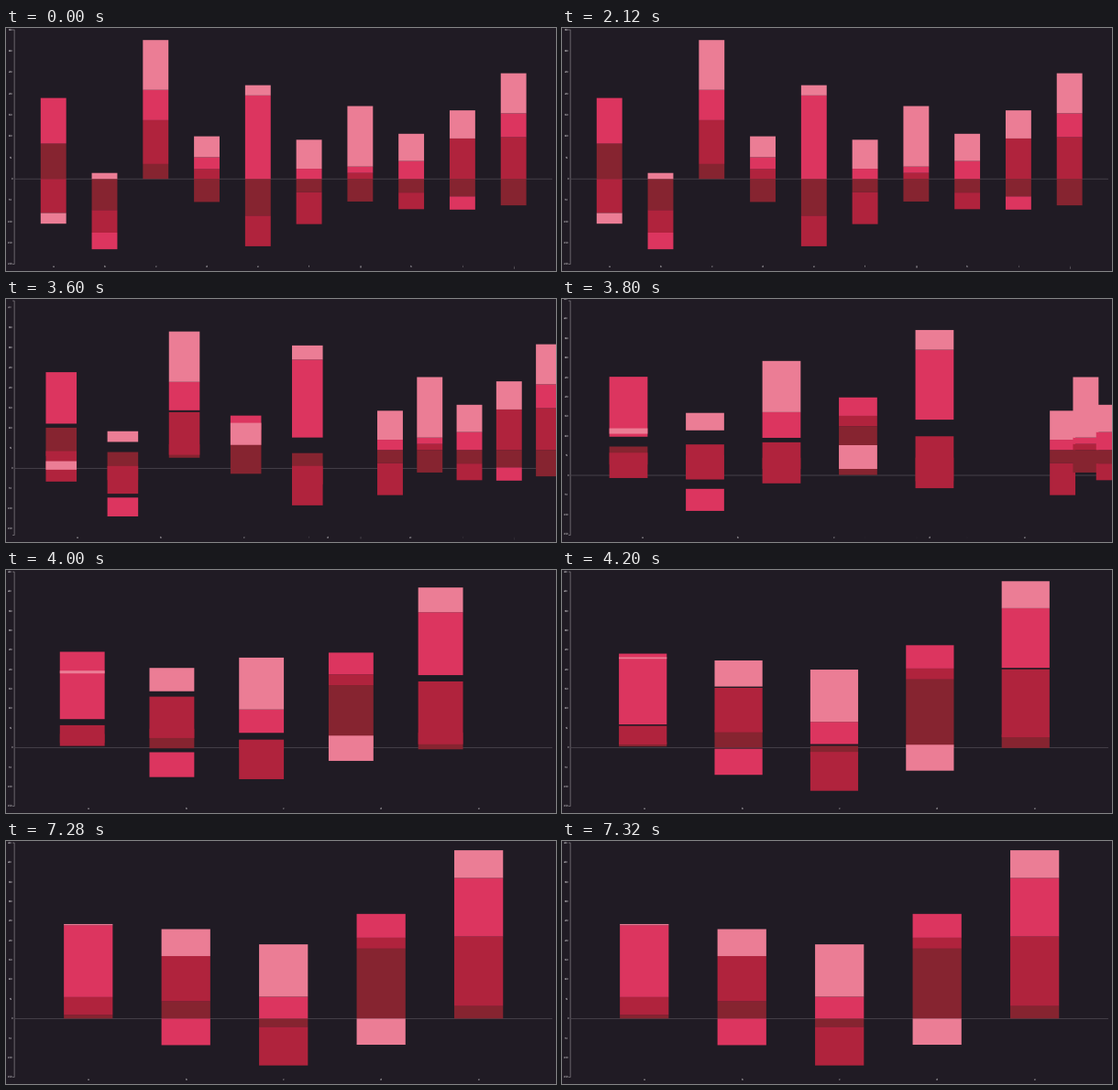
A matplotlib script for the animation above (8000 ms loop, 600x266 px).

```python
import matplotlib.pyplot as plt
import numpy as np
from matplotlib.animation import FuncAnimation
from matplotlib.patches import Rectangle

W, H, DPI = 600, 266, 100
STEP, FRAMES = 40, 200
START, BAR_TIME, AXIS_TIME = 3026, 1500, 1000

BG, INK, AXIS, RULE = "#201b24", "#e6e3e7", "#8a868c", "#4c4750"

LEFT, RIGHT, TOP, BOTTOM = 9.9, 595.5, 2, 258.5
EXIT_X = 711

# The charted values: for each series colour, ten categories, then five.
SERIES = {
    "#862430": ([83, -73, 35, -54, -86, -31, -53, -32, -41, -62],
                [9, 44, -21, 179, 32]),
    "#b0233d": ([-80, -53, 103, 23, -72, -75, 14, -39, 95, 98],
                [46, 116, -99, 28, 178]),
    "#dc355f": ([107, -39, 71, 28, 196, 24, 15, 42, -31, 56],
                [184, -68, 56, 61, 150]),
    "#eb7d95": ([-25, 14, 117, 49, 24, 68, 142, 64, 66, 94],
                [3, 69, 134, -67, 71]),
}


def ease(ms, duration):
    t = min(max((ms - START) / duration, 0), 1)
    return 4 * t**3 if t < 0.5 else 1 - 4 * (1 - t) ** 3


def mix(a, b, p):
    return a + (b - a) * p


def y_scale(low, high):
    unit = (BOTTOM - TOP) / (high - low)
    return lambda v: BOTTOM - (v - low) * unit


def bands(n):
    """Left edges and width of n bars with half-step padding."""
    step = (RIGHT - LEFT) / (n + 0.5)
    return LEFT + step * (np.arange(n) + 0.5), step / 2


def layout(series, scale):
    """Boxes (x, y, width, height) by category, stacked outward from zero."""
    values = np.array(series).T
    xs, width = bands(len(values))
    boxes = []
    for x, row in zip(xs, values):
        ends = {True: 0, False: 0}
        for v in row:
            base = ends[v > 0]
            tip = ends[v > 0] = base + v
            top, bottom = scale(max(base, tip)), scale(min(base, tip))
            boxes.append((x, top, width, bottom - top))
    return np.array(boxes)


y_old, y_new = y_scale(-200, 350), y_scale(-150, 450)
before, after = zip(*SERIES.values())
old, new = layout(before, y_old), layout(after, y_new)

# Categories that leave slide off to the right, unchanged.
leaving = old[len(new):].copy()
leaving[:, 0] = EXIT_X
new = np.vstack([new, leaving])

plt.rcParams["text.hinting"] = "none"
fig = plt.figure(figsize=(W / DPI, H / DPI), dpi=DPI, facecolor=BG)
ax = fig.add_axes([0, 0, 1, 1])
ax.set(xlim=(0, W), ylim=(H, 0))
ax.axis("off")


def label(x, y, s, px, align):
    return ax.text(x, y, s, color=INK, size=px * 72 / DPI, ha=align,
                   va="center", family="Liberation Sans", clip_on=True)


ax.plot([7.5, 9.1, 9.1, 7.5], [TOP, TOP, BOTTOM, BOTTOM],
        color=AXIS, lw=0.5, snap=False)
zero_line, = ax.plot([LEFT, RIGHT], [0, 0], color=RULE, lw=0.6, snap=False)

rects = [ax.add_patch(Rectangle((0, 0), 0, 0, fc=color, lw=0, zorder=3,
                                snap=False))
         for _ in before[0] for color in SERIES]

y_labels = {v: label(7, 0, str(v), 2.7, "right") for v in range(-200, 451, 50)}

(x_old, w_old), (x_new, w_new) = bands(len(before[0])), bands(len(after[0]))
x_labels = [label(x + w_old / 2, 261.3, c, 3.4, "center")
            for x, c in zip(x_old, "abcdefghij")]


def draw(i):
    ms = i * STEP
    p, q = ease(ms, BAR_TIME), ease(ms, AXIS_TIME)
    for rect, box in zip(rects, mix(old, new, p)):
        rect.set_bounds(*box)

    zero = mix(y_old(0), y_new(0), q)
    zero_line.set_ydata([zero, zero])
    for v, text in y_labels.items():
        text.set_y(mix(y_old(v), y_new(v), q))
        text.set_alpha(q if v > 350 else 1 - q if v < -150 else 1)

    for text, a, b in zip(x_labels, x_old, x_new):
        text.set_x(mix(a + w_old / 2, b + w_new / 2, q))
    for text in x_labels[len(x_new):]:
        text.set_alpha(1 - q)
    return rects


anim = FuncAnimation(fig, draw, frames=FRAMES, interval=STEP,
                     repeat=True, repeat_delay=0, blit=False)
plt.show()
```
